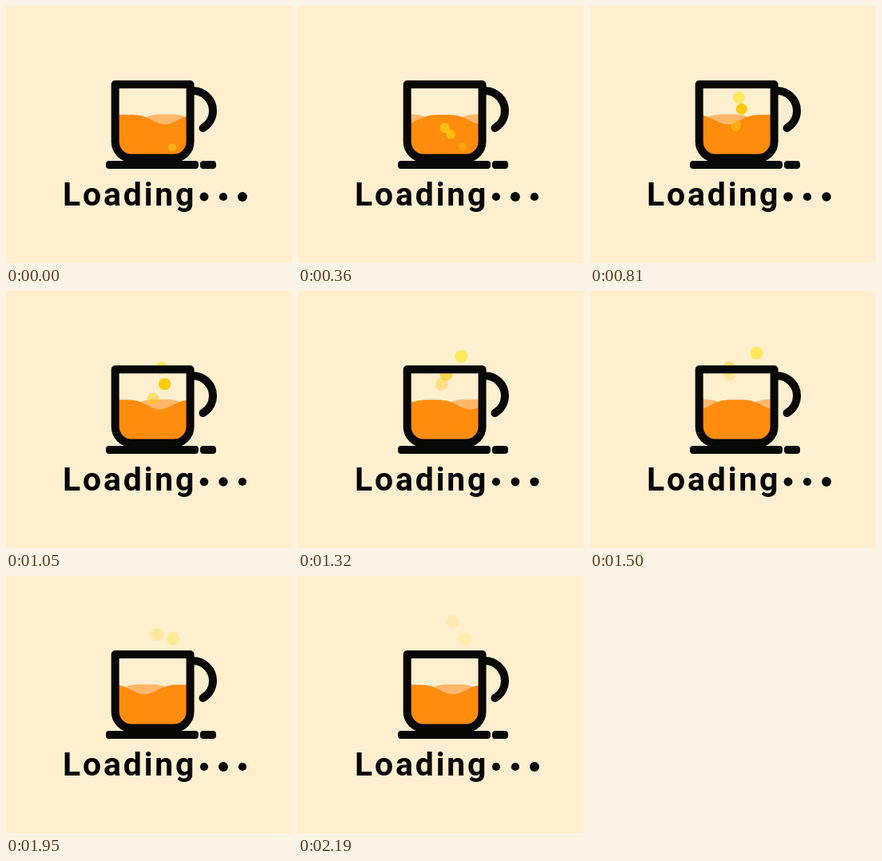
An HTML page with a canvas for the animation above (2.25 s loop, 358x322 px).

```html
<!DOCTYPE html>
<html lang="en">
<head>
<meta charset="utf-8">
<title>Loading</title>
<style>
  html, body { margin: 0; width: 100%; height: 100%; overflow: hidden; background: #ffefcf; }
  canvas, svg { position: absolute; left: 0; top: 0; width: 358px; height: 322px; }
  text { font: 700 41px Roboto, "Liberation Sans", sans-serif; letter-spacing: 2.8px; fill: #060605; }
</style>
</head>
<body>
<canvas id="stage" width="358" height="322"></canvas>
<svg viewBox="0 0 358 322"><text x="71" y="250">Loading</text></svg>
<script>
const LOOP = 2250, STEP = 30, TAU = Math.PI * 2;
const PAPER = '#ffefcf', INK = '#080806';
const CUP = { left: 136.7, right: 230.6, top: 98.3, bottom: 190.6, radius: 20.5 };
const ctx = document.getElementById('stage').getContext('2d');

// Each bubble rises along one cubic curve, swaying, then fades from a given time
const bubbles = [
  { from: 0, to: 1680, xs: [208, 145, 215, 209], ys: [177, 149, 65, 79],
    sway: 0, color: '#ffe414', peak: 0.62, fade: 1680 },
  { from: 180, to: 2190, xs: [202, 182, 185, 183], ys: [178, 108, 108, 57],
    sway: 12, color: '#ffc90e', peak: 1, fade: 1150 },
  { from: 330, to: 2190, xs: [206, 170, 172, 190], ys: [178, 144, 100, 57],
    sway: 5, color: '#ffc90e', peak: 0.5, fade: 1200 }
];

function bezier([a, b, c, d], u) {
  const v = 1 - u;
  return v * v * v * a + 3 * v * v * u * b + 3 * v * u * u * c + u * u * u * d;
}

function disc(x, y, r) {
  ctx.beginPath();
  ctx.arc(x, y, r, 0, TAU);
  ctx.fill();
}

function drawBubble(b, t) {
  const age = t - b.from;
  if (age < 0) return;
  const u = Math.min(1, age / (b.to - b.from));
  const x = bezier(b.xs, u) + b.sway * Math.sin(12 * u - 3.7);
  const rise = Math.min(1, 0.65 + age / 1200);
  const fade = Math.exp(-Math.max(0, t - b.fade) / 450);
  ctx.globalAlpha = b.peak * rise * fade;
  ctx.fillStyle = b.color;
  disc(x, bezier(b.ys, u), 5.3 + 2.7 * Math.min(1, age / 1000));
  ctx.globalAlpha = 1;
}

// Broad crests and narrow troughs, thanks to the second harmonic
function wave(crest, mean, color) {
  const { left, right, bottom } = CUP;
  ctx.beginPath();
  ctx.moveTo(left, bottom);
  for (let x = left; x <= right; x++) {
    const a = (x - crest) / 96 * TAU;
    ctx.lineTo(x, mean - 6 * Math.cos(a) + 1.5 * Math.cos(2 * a));
  }
  ctx.lineTo(right, bottom);
  ctx.fillStyle = color;
  ctx.fill();
}

function cupPath() {
  const { left, right, top, bottom, radius } = CUP;
  ctx.beginPath();
  ctx.roundRect(left, top, right - left, bottom - top, [0, 0, radius, radius]);
}

function drawLiquid(t) {
  const crest = 151 + 192 * t / LOOP;
  ctx.save();
  cupPath();
  ctx.clip();
  wave(crest + 49, 140.2, '#ffb76c');
  wave(crest, 140.8, '#ff8c0d');
  ctx.restore();
}

function drawCup() {
  ctx.strokeStyle = ctx.fillStyle = INK;
  ctx.lineWidth = 10;
  ctx.lineJoin = ctx.lineCap = 'round';
  cupPath();
  ctx.stroke();
  ctx.beginPath();
  ctx.arc(234, 131.3, 25, -TAU / 4, TAU / 6);
  ctx.stroke();
  ctx.beginPath();
  ctx.roundRect(125, 194, 116, 10, 4);
  ctx.roundRect(243, 194, 20, 10, 4);
  ctx.fill();
}

function drawDots(t) {
  const period = LOOP / 3, half = 160;
  for (let i = 0; i < 3; i++) {
    const gap = Math.abs(t % period - (145 + 275 * i));
    const d = Math.min(gap, period - gap, half);
    disc(248 + 24 * i, 239, 5.1 + 0.9 * Math.sqrt(Math.max(0, Math.cos(d / half * TAU / 4))));
  }
}

function draw(now) {
  const t = Math.min(Math.floor(now % LOOP / STEP) * STEP, LOOP - 2 * STEP);
  ctx.fillStyle = PAPER;
  ctx.fillRect(0, 0, 358, 322);
  drawLiquid(t);
  bubbles.forEach(b => drawBubble(b, t));
  drawCup();
  drawDots(t);
}

let start;
function tick(now) {
  start ??= now;
  draw(now - start);
  requestAnimationFrame(tick);
}
draw(0);
requestAnimationFrame(tick);
</script>
</body>
</html>
```
